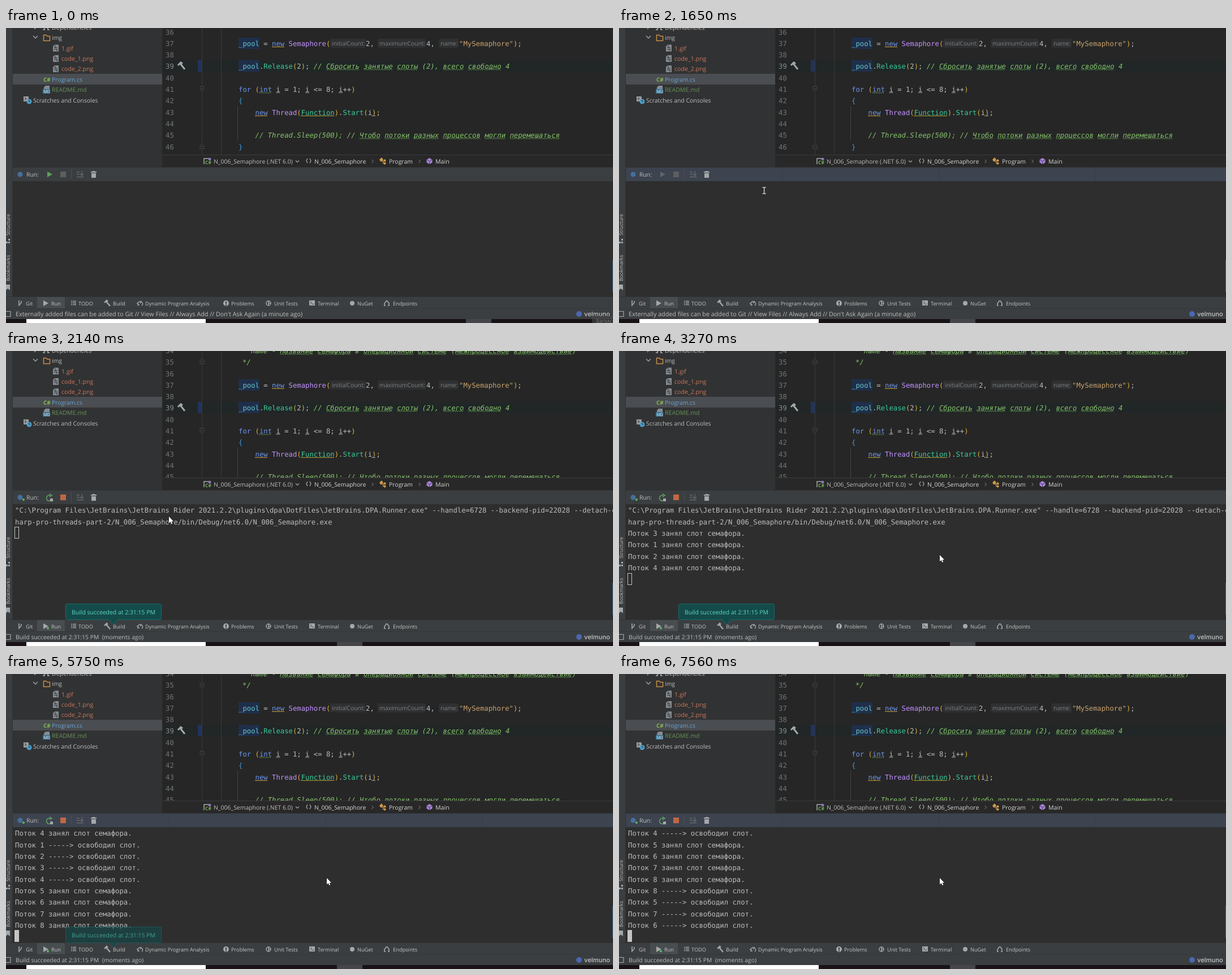
Animation of 1073 by 522 pixels, one loop 8000 ms. Source, as an HTML page with a canvas:

```html
<!DOCTYPE html>
<html lang="en">
<head>
<meta charset="utf-8">
<title>Semaphore run</title>
<style>
html, body { margin: 0; width: 1073px; height: 522px; overflow: hidden; background: #262626; }
canvas { display: block; }
</style>
</head>
<body>
<canvas id="stage" width="1073" height="522"></canvas>
<script>
const ctx = document.getElementById('stage').getContext('2d');
const W = 1073, PITCH = 7.375, ROW = 20.3, LOOP = 8000;
const GREY = '#bdbdbd', BLUE = '#6c95eb', TEAL = '#66c3cc', VIOLET = '#c191ff',
  MINT = '#39cc9b', GOLD = '#e0b03c', GREEN = '#85c46c', SAND = '#c9a26d',
  BAR = '#3b3e40', FOCUS = '#3d434f', ICON = '#a5a8aa', DIM = '#626566', MARK = '#1f2f4a';

function rect(x, y, w, h, color) {
  ctx.fillStyle = color;
  ctx.fillRect(x, y, w, h);
}

function dot(x, y, r, color) {
  ctx.fillStyle = color;
  ctx.beginPath();
  ctx.arc(x, y, r, 0, 7);
  ctx.fill();
}

// Strokes the path when a line width is given, fills it otherwise.
function icon(x, y, d, color, width) {
  ctx.save();
  ctx.translate(x, y);
  const path = new Path2D(d);
  ctx.fillStyle = ctx.strokeStyle = color;
  ctx.lineWidth = width || 1;
  if (width) ctx.stroke(path); else ctx.fill(path);
  ctx.restore();
}

function ui(text, x, y, size = 10.45, color = GREY) {
  ctx.font = `${size}px "Open Sans", "Noto Sans", sans-serif`;
  ctx.fillStyle = color;
  ctx.fillText(text, x, y);
}

// Monospaced text on a fixed grid; parts are colour, text, colour, text...
function code(x, y, parts, style = '') {
  ctx.font = `${style} 12.25px "DejaVu Sans Mono", monospace`;
  const base = Math.round(y + 4.5);
  for (let i = 0; i < parts.length; i += 2) {
    ctx.fillStyle = parts[i];
    for (const ch of parts[i + 1]) {
      if (ch !== ' ') ctx.fillText(ch, x, base);
      x += PITCH;
    }
  }
}

function wave(x, y, w) {
  ctx.beginPath();
  for (let i = 0; i <= w; i += 2) ctx.lineTo(x + i, y + (i % 4 ? 1 : -1));
  ctx.strokeStyle = '#5f9e4c';
  ctx.lineWidth = 1;
  ctx.stroke();
}

function comment(x, y, text) {
  code(x, y, [GREEN, text], 'italic');
  for (const m of text.matchAll(/[а-я]{2,}/gi))
    wave(x + m.index * PITCH, y + 6.5, m[0].length * PITCH);
}

function hint(text, x, y, w) {
  ctx.fillStyle = '#2f3031';
  ctx.beginPath();
  ctx.roundRect(x - 3, y - 8, w + 5, 16, 3);
  ctx.fill();
  ui(text, x, y + 4, 10.4, '#7d8183');
}

const HAMMER = 'M-6-1L-1-6L2-4M-2-4L6 6';
const CHEVRON = 'M-4-2L0 2L4-2';
const PLAY = 'M-4-5L5 0L-4 5Z';
const ARROW = 'M0 0V11.5L2.7 9L4.5 13L6.3 12.2L4.6 8.5H8.2Z';
const PAGE = 'M-2-6H5V6H-5V-3Z';

const lines = {
  34: y => comment(418, y, '* name - Название семафора в операционной системе (межпроцессное взаимодействие)'),
  35: y => comment(418, y, '*/'),
  37: y => {
    rect(411, y - 10, 37, 20, MARK);
    code(411, y, [TEAL, '_pool', GREY, ' = ', BLUE, 'new ', VIOLET, 'Semaphore', GOLD, '(']);
    rect(470, y + 6, 22, 1, '#c99a3a');
    hint('initialCount:', 576, y, 58);
    code(636, y, [GREY, '2,']);
    hint('maximumCount:', 660, y, 80);
    code(743, y, [GREY, '4,']);
    hint('name:', 768, y, 30);
    code(801, y, [SAND, '"MySemaphore"', GOLD, ')', GREY, ';']);
  },
  39: y => {
    rect(411, y - 10, 37, 20, MARK);
    code(411, y, [TEAL, '_pool', GREY, '.', MINT, 'Release', GOLD, '(', GREY, '2', GOLD, ')', GREY, ';']);
    comment(411 + 18 * PITCH, y, '// Сбросить занятые слоты (2), всего свободно 4');
    icon(310, y, HAMMER, ICON, 3);
  },
  41: y => {
    code(411, y, [BLUE, 'for ', GOLD, '(', BLUE, 'int', GREY, ' i = 1; i <= 8; i++', GOLD, ')']);
    for (let x = 448; x < 469; x += 3) rect(x, y + 6, 1.5, 1.5, '#6a9c4c');
    for (const col of [9, 16, 24]) rect(411 + col * PITCH, y + 6, 7, 1, '#9a9a9a');
  },
  42: y => code(411, y, ['#3f97dd', '{']),
  43: y => {
    code(440.5, y, [BLUE, 'new ', VIOLET, 'Thread', GOLD, '(', MINT, 'Function', GOLD, ')', GREY, '.',
      MINT, 'Start', GOLD, '(', GREY, 'i', GOLD, ')', GREY, ';']);
    rect(440, y + 6, 22, 1, '#c99a3a');
    rect(521, y + 6, 59, 1, '#a8a33c');
    rect(646, y + 6, 7, 1, '#9a9a9a');
  },
  45: y => comment(440.5, y, '// Thread.Sleep(500); // Чтобо потоки разных процессов могли перемешаться'),
  46: y => code(411, y, ['#3f97dd', '}'])
};

function editor(bottom, shift) {
  const at = n => Math.round(26.8 + (n - 37) * ROW) + shift;
  ctx.save();
  ctx.beginPath();
  ctx.rect(277, 0, W - 277, bottom);
  ctx.clip();
  rect(277, 0, W, bottom, '#262626');
  rect(277, at(39) - 10, W, 20, '#212626');
  rect(339, at(39) - 10, 7, 20, '#21335e');
  rect(346, 0, 1, bottom, '#393939');
  rect(380, 0, 1, bottom, '#393939');
  rect(409, at(42) + 10, 1, 3 * ROW, '#444');
  for (let n = 34; n < 47; n++) {
    code(282, at(n), [n === 39 ? '#8b8b8b' : '#707476', '' + n]);
    if (lines[n]) lines[n](at(n));
  }
  for (const [n, up] of [[35, -1], [41, 1], [46, -1]]) {
    const fold = `M-3.5 ${-4 * up}H3.5V${up}L0 ${5 * up}L-3.5 ${up}ZM-2 0H2`;
    rect(342, at(n) - 5, 8, 10, '#262626');
    icon(346.5, at(n) - 0.5, fold, '#464646', 1);
  }
  ctx.restore();
}

function breadcrumbs(top) {
  const y = top + 12;
  rect(277, top, W, 22, '#282828');
  rect(277, top, W, 1, '#3b3b3b');
  icon(355, y, 'M-5-2V-5H6V-2M-5-5V5', ICON, 1.5);
  dot(360, y - 4, 2.5, '#8877b5');
  ctx.font = 'bold 8.5px "Open Sans", sans-serif';
  ctx.fillStyle = '#6fae52';
  ctx.fillText('C#', 352, y + 5);
  ui('N_006_Semaphore (.NET 6.0)', 367, y + 4);
  icon(515, y, 'M-3-1.5L0 1.5L3-1.5', ICON, 1.2);
  icon(535, y - 1, 'M-2-4L-4 0L-2 4M2-4L4 0L2 4', ICON, 1.3);
  ui('N_006_Semaphore', 545, y + 4, 10.45, '#d5d5d5');
  for (const x of [648, 731]) icon(x, y, 'M-1.5-3L1.5 0L-1.5 3', '#8a8a8a', 1);
  icon(666, y, 'M-6-3L-2-7L1-3L-3 1ZM1-2L4-4L6-1L3 1ZM1 3L4 1L6 4L3 6ZM-1-1H2V0H1V3H2V4H0V0H-1Z', '#d39a4a');
  ui('Program', 677, y + 4, 10.45, '#d5d5d5');
  icon(748.5, y - 1, 'M-5-2L0-5L5-2V3L0 6L-5 3Z', '#a584d6');
  icon(748.5, y - 1, 'M-5-2L0 1L5-2M0 1V6', '#49396a', 1);
  ui('Main', 759, y + 4, 10.6, '#d5d5d5');
}

function tree(bottom) {
  rect(12, 0, 265, bottom, '#313233');
  rect(12, 81, 265, 19, '#4a4d51');
  rect(276, 0, 1, bottom, '#292929');
  icon(52, -2, 'M-2-4L2 0L-2 4', ICON, 1.3);
  icon(71, -1, 'M-4 4L0-3L4 4M-6 4H-2M2 4H6', ICON, 1.6);
  ui('Dependencies', 81, 3, 10.6);
  icon(52, 16, CHEVRON, ICON, 1.3);
  icon(72, 17.5, 'M-5.5 5V-5H-1L1-3H5.5V5Z', '#c98f48', 1.5);
  ui('img', 81, 21);
  ['1.gif', 'code_1.png', 'code_2.png'].forEach((name, i) => {
    const y = 35.5 + i * 18.4;
    icon(88, y, PAGE, '#858c91');
    icon(88, y, 'M-3-1H3M-3 2H3M-1-5V0M2 1V5', '#313233', 1);
    ui(name, 98, Math.round(y + 4), 10.6, '#c9785c');
  });
  ctx.font = 'bold 10px "Open Sans", sans-serif';
  ctx.fillStyle = '#86b950';
  ctx.fillText('C#', 66, 95);
  ui('Program.cs', 81, 95, 10.3, '#6ba5d7');
  icon(72, 108, PAGE, '#858c91');
  rect(65, 108, 13, 8, '#3f7796');
  ui('MD', 66.5, 115, 7, '#e0e8ec');
  ui('README.md', 81, 113, 10.6, '#67935a');
  icon(36, 126, 'M-5-5H4V4H-5Z', '#969b9e');
  icon(35, 125, 'M-2-2L1 0L-2 2', '#313233', 1);
  dot(41, 130, 4.5, '#4e9bc4');
  icon(41, 130, 'M0-3V0H2', '#24475a', 1.2);
  ui('Scratches and Consoles', 48, 132);
}

function header(y, h, focused) {
  rect(12, y, W, h, focused ? FOCUS : BAR);
  if (focused) for (const x of [288, 565, 841]) rect(x, y, 1, h, '#383d48');
  rect(12, y, W, 1, '#313233');
}

function runHeader(s) {
  header(246, 25, s.focused);
  dot(25, 259, 4.5, '#456f9c');
  if (s.running) dot(31, 263, 2, '#5fb865');
  ui('Run:', 36, 263);
  if (s.hover) rect(67, 249, 22, 20, '#2a2c2d');
  if (s.running) {
    icon(77, 260, 'M4.5 1A5 5 0 1 1 1-4.5M0-7L4-4.5L0-2', '#5f9f62', 1.6);
    rect(78, 261, 5, 5, ICON);
  } else icon(77, 259, PLAY, s.idle ? '#5d9f5b' : DIM);
  rect(96, 254, 10, 10, s.running ? '#c06745' : '#5c5e5f');
  rect(115, 250, 1, 17, '#4b4e50');
  icon(131, 259, 'M-6-4H-1M-6 0H-1M-6 4.5H6M3-6V1M0-1L3 2L6-1', '#66696a', 1.3);
  icon(155, 259, 'M-5-5H-2V-6H2V-5H5V-3H-5ZM-4-2H4V6H-4Z', ICON);
}

const took = n => `Поток ${n} занял слот семафора.`;
const freed = n => `Поток ${n} -----> освободил слот.`;
const output = [
  '"C:\\Program Files\\JetBrains\\JetBrains Rider 2021.2.2\\plugins\\dpa\\DotFiles\\JetBrains.DPA.Runner.exe" --handle=6728 --backend-pid=22028 --detach-child',
  'harp-pro-threads-part-2/N_006_Semaphore/bin/Debug/net6.0/N_006_Semaphore.exe',
  ...[3, 1, 2, 4].map(took), ...[1, 2, 3, 4].map(freed),
  ...[5, 6, 7, 8].map(took), ...[8, 5, 7, 6].map(freed)
];

function terminal(t, focused) {
  rect(12, 271, W, 204, '#2e2e2e');
  if (t < 2070) return;
  const count = t < 2530 ? 2 : t < 4610 ? 6 : t < 6560 ? 14 : 18;
  const shown = output.slice(Math.max(0, count - 9), count);
  shown.forEach((text, i) => code(16, 281.9 + i * ROW, [GREY, text]));
  const y = Math.round(271.7 + shown.length * ROW);
  if (!focused) {
    ctx.strokeStyle = '#c4c4c4';
    ctx.lineWidth = 1;
    ctx.strokeRect(15.5, y - 0.5, 7, 20);
  } else if (t < 7020 || t >= 7560) rect(15, 453, 8, 21, '#c4c4c4');
}

function buildPanel() {
  header(226, 25, true);
  ui('Build:', 18, 243);
  ui('Build succeeded', 63, 243);
  rect(52, 248, 101, 3, '#4b6fa8');
  rect(12, 251, 26, 224, '#38393a');
  rect(38, 251, W, 224, '#2e2e2e');
  icon(24, 263, HAMMER, '#62994f', 3);
  rect(15, 275, 20, 21, '#242526');
  icon(25, 286, 'M-6-5H-1V-2H-6ZM0-1H6V2H0ZM0 3H6V6H0ZM-4-2H-3V5H0V4H-3Z', ICON);
  icon(25, 309, 'M-6-5H2V-3H6V6H-4V2H-6Z', '#8a9499');
  icon(26, 310, 'M-4 4L-1-1L2 3L4 1', '#4e9bc4', 1.6);
  for (const y of [324, 378]) rect(16, y, 18, 1, '#505254');
  icon(25, 340, 'M0 5V-4M-4 0L0-4L4 0', DIM, 1.6);
  icon(25, 364, 'M0-5V4M-4 0L0 4L4 0', DIM, 1.6);
  icon(25, 394, 'M-5 5L2-2M1-5A3.5 3.5 0 1 0 5-1', ICON, 2.4);
  ctx.font = 'bold 14px "Open Sans", sans-serif';
  ctx.fillStyle = ICON;
  ctx.fillText('?', 21.5, 423);
  icon(25, 442, 'M-4-4L4 4M4-4L-4 4', ICON, 1.7);
}

// Label, text x, icon x, icon path, line width
const tabs = [
  ['Git', 35, 25, 'M-2-4V4M-2 2Q2 2 2-3M-3-4H-1M1-3H3M-3 4H-1', 1.6],
  ['Run', 80, 70, PLAY, 0],
  ['TODO', 128, 119, 'M-4-3.5H-2M-1-3.5H5M-4-.5H-2M-1-.5H5M-4 2.5H-2M-1 2.5H5', 1.4],
  ['Build', 189, 179, 'M-5-1L-1-5L1-3M-2-3L5 5', 2.4],
  ['Dynamic Program Analysis', 246, 237, 'M-3 3A4 4 0 1 1 3 4M0 0L3-3M-6 0H-3M-5 3H-1', 1.3],
  ['Problems', 398, 389, 'M-5 0A5 5 0 1 1 5 0A5 5 0 1 1-5 0ZM-1-3V1H1V-3ZM-1 2V4H1V2Z', 0],
  ['Unit Tests', 474, 464, 'M-4 0A4 4 0 1 1 4 0A4 4 0 1 1-4 0M0-4V4M0 0H4', 1.5],
  ['Terminal', 551, 541, 'M-5-5H5V4H-5ZM-3-3L-1-1L-3 1V2L0-1L-3-4ZM0 1V2H3V1Z', 0],
  ['NuGet', 621, 612, 'M-4 0A4 4 0 1 1 4 0A4 4 0 1 1-4 0', 0],
  ['Endpoints', 684, 673, 'M-4 4V0L-1-3M4 4V0L1-4M-5 4H-2M2 4H5M-2-4H2', 1.6]
];

function bottomBars(s) {
  rect(0, 475, W, 40, BAR);
  rect(0, 475, W, 1, '#303132');
  rect(0, 496, W, 1, '#333536');
  rect(s.build ? 165 : 55, 476, s.build ? 52 : 49, 20, '#484d4f');
  for (const [label, x, ix, d, width] of tabs) {
    icon(ix, 487, d, ICON, width);
    ui(label, x, 491, 9.2, '#c3c3c3');
  }
  if (s.running) dot(74, 490.5, 2, '#5fb865');
  icon(4, 506, 'M-5-4.5H4V4.5H-5', ICON, 1.2);
  if (s.running) {
    ui('Build succeeded at 2:31:15 PM', 17, 510, 10.4);
    ui('(moments ago)', 170, 510, 10.4);
  } else ui("Externally added files can be added to Git // View Files // Always Add // Don't Ask Again (a minute ago)", 17, 510, 10.78);
  dot(1013, 506, 5, '#4a68b0');
  ctx.font = '500 11.2px Inter, sans-serif';
  ctx.fillStyle = '#c4c4c4';
  ctx.fillText('velmuno', 1022, 510);
  rect(0, 515, W, 7, '#191317');
  rect(36, 515, 317, 7, '#fff');
}

function sideStripe() {
  rect(0, 0, 11, 475, BAR);
  rect(11, 0, 1, 475, '#303132');
  for (const [label, y] of [['Structure', 367], ['Bookmarks', 448]]) {
    ctx.save();
    ctx.translate(7, y);
    ctx.rotate(-Math.PI / 2);
    ui(label, 0, 0, 8.8);
    ctx.restore();
  }
  icon(3, 377, 'M-3 1H0V4H-3ZM1 1H4V4H1ZM1-4H4V-1H1Z', ICON);
  icon(3, 459, 'M-3-5H4V5L0 2L-3 5Z', ICON);
}

function balloon(alpha) {
  if (alpha <= 0) return;
  ctx.save();
  ctx.globalAlpha = alpha;
  ctx.beginPath();
  ctx.roundRect(105.5, 447.5, 169, 28, 3);
  ctx.fillStyle = '#144b4a';
  ctx.strokeStyle = '#1d6a66';
  ctx.lineWidth = 1;
  ctx.fill();
  ctx.stroke();
  icon(190, 475, 'M-8 0L0 9L8 0Z', '#144b4a');
  icon(190, 475.5, 'M-8 0L0 9L8 0', '#1d6a66', 1);
  ui('Build succeeded at 2:31:15 PM', 116, 466, 10.45, '#5fd6c6');
  ctx.restore();
}

// Progress in n equal jumps, the first at start and the last at end.
function steps(t, start, end, n) {
  if (t < start) return 0;
  return Math.min(n, Math.floor((t - start) / (end - start) * (n - 1) + 1e-6) + 1) / n;
}

const mix = (a, b, u) => a + (b - a) * u;
const smooth = u => u * u * (3 - 2 * u);

function pointer(t) {
  if (t < 1490) {
    const u = 1 - (1 - steps(t, 70, 810, 10)) ** 1.6, v = 1 - u;
    return [v * v * 835 + 2 * u * v * 250 + u * u * 82, v * v * 545 + 2 * u * v * 170 + u * u * 258];
  }
  if (t < 1920) {
    const u = smooth(steps(t, 1490, 1710, 4));
    return [mix(82, 289, u), mix(258, 293, u)];
  }
  const u = smooth(steps(t, 2860, 3270, 6));
  return [mix(288, 567, u), mix(293, 361, u)];
}

function drawPointer(t) {
  const [x, y] = pointer(t);
  if (t >= 940 && t < 1220) dot(81, 258, 11, 'rgba(205,187,20,.76)');
  if (t >= 1490 && t < 1920 && y > 271) {
    icon(x, y, 'M-3-5.5H3M0-5.5V5.5M-3 5.5H3', '#e8e8e8', 1.2);
    return;
  }
  icon(x, y, ARROW, '#222', 1.4);
  icon(x, y, ARROW, '#fff');
}

function draw(t) {
  const build = t >= 1850 && t < 1920;
  const s = {
    build,
    running: t >= 1850,
    idle: t < 1350,
    hover: t >= 810 && t < 1350,
    focused: (t >= 1220 && t < 1850) || t >= 5610
  };
  const split = build ? 226 : 246;
  ctx.textRendering = 'geometricPrecision';
  editor(split - 22, t < 1850 ? 0 : 33);
  breadcrumbs(split - 22);
  tree(split);
  if (build) buildPanel();
  else {
    runHeader(s);
    terminal(t, s.focused);
  }
  rect(1072, 410, 1, 57, '#4a6486');
  sideStripe();
  bottomBars(s);
  if (t < 70) rect(813, 515, 45, 7, '#46464a');
  if (t >= 1350) rect(585, 515, 45, 7, '#46464a');
  if (t < 150) {
    rect(1036, 509, 37, 13, 'rgba(70,70,72,.6)');
    ui('Запись', 1042, 522, 10.4, '#777');
  }
  balloon(Math.min(steps(t, 1920, 2140, 4), 1 - steps(t, 5610, 6100, 8)));
  drawPointer(t);
}

const start = performance.now();
function tick() {
  draw((performance.now() - start) % LOOP);
  requestAnimationFrame(tick);
}
tick();
</script>
</body>
</html>
```
